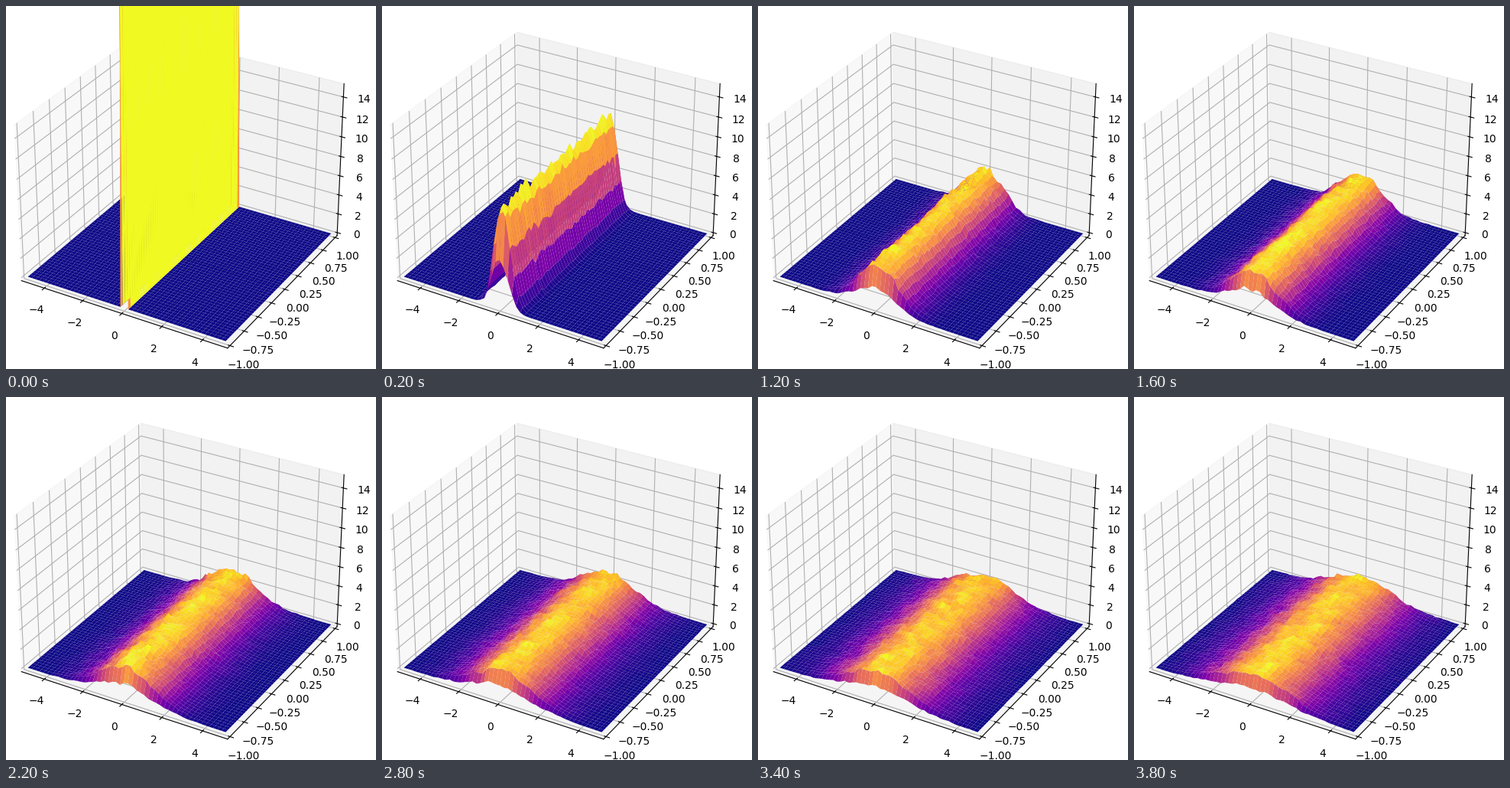
A matplotlib script that plays this animation: 484 px wide and 474 px high, repeating every 4 s.

```python
import matplotlib.pyplot as plt
import numpy as np
from matplotlib.animation import FuncAnimation

W, H, DPI = 484, 474, 100
FRAMES, INTERVAL = 20, 200
CELLS = 50                  # cells along x and y
WALKERS = 120_000
MASS = 10.0
STEP_X, STEP_Y = 0.39, 0.15
X_MAX, Y_MAX, Z_MAX = 5.0, 1.0, 15.0

xs = np.linspace(-X_MAX, X_MAX, CELLS + 1)
ys = np.linspace(-Y_MAX, Y_MAX, CELLS + 1)
X, Y = np.meshgrid(xs, ys)


def reflect(y):
    """Fold positions back into [-1, 1]."""
    return np.abs((y + 3) % 4 - 2) - 1


def cell(pos, half):
    """Cell index and fraction inside the cell."""
    p = (pos + half) / (2 * half) * CELLS
    i = np.clip(p.astype(int), 0, CELLS - 1)
    return i, p - i


def density(px, py):
    """Spread each walker linearly over its four nearest nodes."""
    keep = np.abs(px) < X_MAX
    i, fx = cell(px[keep], X_MAX)
    j, fy = cell(py[keep], Y_MAX)
    n = CELLS + 1
    grid = np.zeros(n * n)
    for di, wx in ((0, 1 - fx), (1, fx)):
        for dj, wy in ((0, 1 - fy), (1, fy)):
            grid += np.bincount((j + dj) * n + i + di, wx * wy, n * n)
    dx = xs[1] - xs[0]
    return grid.reshape(n, n) * MASS * CELLS / (WALKERS * dx)


def simulate():
    rng = np.random.default_rng(4)
    px = np.zeros(WALKERS)
    py = np.linspace(-Y_MAX, Y_MAX, WALKERS)
    states = []
    for _ in range(FRAMES):
        states.append(density(px, py))
        px = px + rng.normal(0, STEP_X, WALKERS)
        py = reflect(py + rng.normal(0, STEP_Y, WALKERS))
    return states


def padded(lo, hi):
    pad = (hi - lo) / 48
    return lo - pad, hi + pad


states = simulate()

fig = plt.figure(figsize=(W / DPI, H / DPI), dpi=DPI)
# The square axes run slightly past the figure edges.
ax = fig.add_axes([-16 / W, -3 / H, 480 / W, 480 / H], projection="3d")
ax.set_xlim(*padded(-X_MAX, X_MAX), view_margin=0)
ax.set_ylim(*padded(-Y_MAX, Y_MAX), view_margin=0)
ax.set_zlim(*padded(0, Z_MAX), view_margin=0)
ax.set_xticks(np.arange(-4, 5, 2))
ax.set_yticks(np.linspace(-1, 1, 9))
ax.set_zticks(np.arange(0, 15, 2))

surface = None


def update(frame):
    global surface
    if surface is not None:
        surface.remove()
    surface = ax.plot_surface(X, Y, states[frame], cmap="plasma",
                              rstride=1, cstride=1)
    return [surface]


anim = FuncAnimation(fig, update, frames=FRAMES, interval=INTERVAL,
                     repeat=True, repeat_delay=0, blit=False)
plt.show()
```
